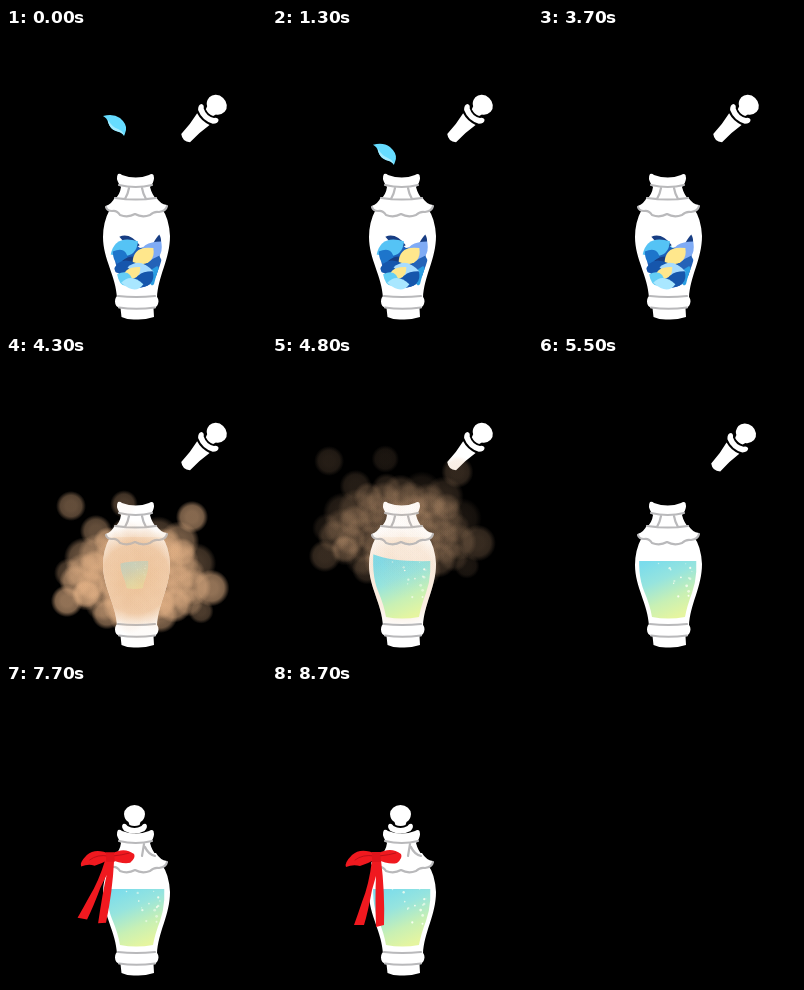
An HTML page with a canvas for the animation above (8.8 s loop, 260 by 300 pixels).

```html
<!DOCTYPE html>
<html lang="en">
<head>
<meta charset="utf-8">
<title>Potion bottle</title>
<style>
  html, body { margin: 0; width: 100%; height: 100%; overflow: hidden; background: #000; }
  canvas { display: block; width: 260px; height: 300px; }
</style>
</head>
<body>
<canvas id="stage" width="260" height="300"></canvas>
<script>
const ctx = document.getElementById('stage').getContext('2d');
const LOOP = 8800, STEP = 100, GRAY = '#b9b9bb';

const clamp = v => Math.max(0, Math.min(1, v));
const span = (t, a, b) => clamp((t - a) / (b - a));
const smooth = p => p * p * (3 - 2 * p);
const easeOut = p => 1 - (1 - p) ** 3;

function track(keys, t) {
  if (t <= keys[0][0]) return keys[0].slice(1);
  for (let i = 1; i < keys.length; i++) {
    const [a, b] = [keys[i - 1], keys[i]];
    if (t <= b[0]) {
      const p = smooth(span(t, a[0], b[0]));
      return a.slice(1).map((v, k) => v + (b[k + 1] - v) * p);
    }
  }
  return keys[keys.length - 1].slice(1);
}

function seeded(seed) {
  return () => (seed = (seed * 16807) % 2147483647) / 2147483647;
}

function layer(draw) {
  ctx.save();
  draw();
  ctx.restore();
}

function fill(path, color) {
  ctx.fillStyle = color;
  ctx.fill(path);
}

function line(path, color, width) {
  ctx.strokeStyle = color;
  ctx.lineWidth = width;
  ctx.lineCap = ctx.lineJoin = 'round';
  ctx.stroke(path);
}

const shape = {
  neck: new Path2D('M112 146Q114 145 116 147Q130 152 143 147Q146 145 147.500 147Q149 152 145.500 157L144 159Q146 167 151 172L108 172Q114 167 115 159L113 156Q109.500 150 112 146Z'),
  collar: new Path2D('M109 169L150 169Q154 176 161 177Q160 184 153 184Q148 183 144 187Q136 190 129 186Q122 190 114 187Q111 182 106 183Q100 182 99.500 178Q106 176 109 169Z'),
  body: new Path2D('M104 181Q97 194 97 209C97 231 110 248 111 270L151 270C152 248 164 231 164 208Q163 190 156 181Z'),
  base: new Path2D('M112 267.500H149Q152.500 269 152.500 273.500Q152 279 147.500 280L148 289Q138 292 130 291.500Q122 292 115.500 289L114.500 280Q109 279 109 273.500Q109 269 112 267.500Z'),
  window: new Path2D('M101 205L158 205Q160 220 154 237Q149 250 147 261Q130 264 114 261Q112 249 106 235Q100 220 101 205Z'),
  liquid: new Path2D('M102 190L157 190Q161 218 154 237Q149 250 147 261Q130 264 114 261Q112 249 106 235Q99 218 102 190Z'),
  rims: new Path2D('M113 157Q130 161 146 157M100 179Q101 183 106 183Q111 182 114 187Q122 190 129 186Q136 190 144 187Q148 183 153 184Q160 183 161 178M112 268Q130 270 149 268M113 279.500Q130 282 149 279.500'),
  facets: new Path2D('M123 160Q122 166 119 171M136 160Q137 166 140 171M109 170Q130 173 150 170'),
  tied: new Path2D('M138 160L136 172M139 163Q142 170 149 172'),
  feather: new Path2D('M-12 -9Q-2 -12 5 -7Q12 -1 11 5Q10 9 9 11Q7 7 1 6Q-5 4 -7 -3Q-8 -7 -12 -9Z'),
  featherEdge: new Path2D('M-7 -5Q-3 2 3 4Q8 6 9 10Q6 7 1 6Q-5 4 -7 -3Z'),
  heap: new Path2D('M110 218Q124 211 134 220Q144 218 153 217Q155 232 151 245Q147 260 130 260Q119 260 115 250Q106 234 110 218Z'),
  plug: new Path2D('M-8.500 20Q0 23 8.500 20Q6 32 6 46Q0 51 -6 46Q-6 32 -8.500 20Z'),
  ring: new Path2D('M-11.500 10Q-9 9 -7 12Q0 16 7 12Q9 9 11.500 10Q14 13 10 17Q0 22 -10 17Q-14 13 -11.500 10Z'),
  knob: new Path2D('M-10.500 0A10.500 9 0 0 1 10.500 0Q10 6 6 8L5 11Q0 13 -5 11L-6 8Q-10 6 -10.500 0Z'),
  bow: new Path2D('M0 -2Q-15 -9 -24 -1Q-32 7 -30 11Q-23 8 -16 10Q-7 7 0 3Q13 9 21 7Q27 2 25 -2Q17 -8 8 -5Q4 -4 0 -2Z'),
  tails: new Path2D('M-4 4L5 4Q9 36 8 69L0 71Q-1 40 0 20L-4 34Q-8 56 -12 69L-22 69Q-18 58 -14 46Q-7 29 -4 4Z'),
  folds: new Path2D('M-2 0Q-13 -2 -21 4M3 0Q13 -1 20 -3')
};

// x, y, half length, half width, angle, color
const petals = [
  [123, 214, 11, 9, .5, '#173d83'], [150, 216, 10, 8, 1.9, '#173d83'],
  [144, 222, 14, 19, 2.5, '#7fabf5'], [119, 222, 15, 18, -.3, '#55c3f5'],
  [113, 230, 9, 15, .8, '#1d75cb'], [147, 238, 12, 17, 2.1, '#2462b8'],
  [128, 238, 13, 16, .4, '#173d83'], [138, 230, 13, 17, -.5, '#ffe78c'],
  [119, 241, 12, 15, -.2, '#1656ac'], [147, 247, 10, 14, 2, '#2b9ee2'],
  [134, 243, 13, 14, .3, '#a7dcff'], [126, 247, 11, 12, -.5, '#ffe78c'],
  [118, 252, 9, 14, .7, '#63cef5'], [139, 253, 12, 15, -.6, '#1656ac'],
  [126, 257, 11, 12, .2, '#a9e7ff']
];

const featherKeys = [
  [0, 109, 97, 0], [500, 122, 106, -.35], [1100, 108, 121, .15],
  [1700, 127, 140, -.4], [2100, 126, 157, -.1], [2600, 137, 180, -.35],
  [3100, 129, 203, .1], [3600, 128, 225, 0]
];
const stopperKeys = [
  [5400, 211, 76.5, .75], [6300, 129, 93, 0], [6600, 129, 110, 0],
  [7200, 129, 125, 0], [7400, 128.5, 130, 0]
];

const rand = seeded(71);
const puffs = [
  [65, 150, 13, .4], [118, 148, 12, .3], [186, 161, 14, .55], [205, 232, 16, .6],
  [61, 245, 14, .6], [63, 217, 13, .3], [80, 238, 12, .6], [195, 255, 11, .3], [90, 175, 14, .4]
];
for (let i = 0; i < 54; i++) {
  const a = i * 2.4, d = Math.sqrt((i + 1) / 54);
  puffs.push([
    132 + Math.cos(a) * d * 64, 220 + Math.sin(a) * d * 46,
    12 + rand() * 6, .25 + rand() * .35
  ]);
}
const sparkles = Array.from({ length: 15 }, () => [
  120 + rand() * 34, 206 + rand() * 40, .5 + rand() * .9, rand() * 6
]);

function drawStopper(t) {
  const [x, y, angle] = track(stopperKeys, t);
  layer(() => {
    ctx.translate(x, y);
    ctx.rotate(angle);
    for (const part of [shape.plug, shape.knob, shape.ring]) {
      line(part, '#000', 1.5);
      fill(part, '#fff');
    }
  });
}

function drawSmoke(t, strength) {
  if (t <= 3700 || t >= 5500) return;
  const grow = easeOut(span(t, 3600, 4300));
  const late = Math.max(0, t - 4300) / 500;
  const rise = 45 * late ** 1.4;
  const fade = strength * span(t, 3650, 4150) * (1 - span(t, 4300, 5500)) ** 1.9;
  for (const [px, py, r, alpha] of puffs) {
    const x = 130 + (px - 130) * grow * (1 + .06 * late * late) - 4 * late;
    const y = 215 + (py - 215) * grow - rise;
    const g = ctx.createRadialGradient(x, y, r * .4, x, y, r * 1.15);
    g.addColorStop(0, `rgba(228,178,134,${alpha * fade})`);
    g.addColorStop(.55, `rgba(228,178,134,${alpha * fade * .85})`);
    g.addColorStop(1, 'rgba(228,178,134,0)');
    ctx.fillStyle = g;
    ctx.fillRect(x - 24, y - 24, 48, 48);
  }
}

function drawFeather(t, alpha) {
  const [x, y, angle] = track(featherKeys, t);
  layer(() => {
    ctx.globalAlpha = alpha;
    ctx.translate(x, y);
    ctx.rotate(angle);
    fill(shape.feather, '#66dcff');
    fill(shape.featherEdge, '#a5ecff');
  });
}

function drawPetals(t) {
  const alpha = 1 - span(t, 3800, 4300);
  if (!alpha) return;
  layer(() => {
    ctx.clip(shape.window);
    drawFeather(t, alpha);
    ctx.globalAlpha = alpha;
    fill(shape.heap, '#1d5fb8');
    for (const [x, y, l, w, angle, color] of petals) {
      layer(() => {
        ctx.translate(x, y);
        ctx.rotate(angle);
        fill(new Path2D(`M${-l} 0Q${-l / 3} ${-w} ${l} ${-w / 4}Q${l / 2} ${w * .8} ${-l} 0Z`), color);
      });
    }
  });
}

function drawTint(t) {
  const alpha = span(t, 3700, 4200) * (1 - span(t, 4350, 5100));
  if (!alpha) return;
  const g = ctx.createRadialGradient(130, 224, 8, 130, 222, 52);
  g.addColorStop(0, `rgba(238,194,150,${alpha * .9})`);
  g.addColorStop(.6, `rgba(241,202,164,${alpha * .85})`);
  g.addColorStop(1, 'rgba(246,216,184,0)');
  fill(shape.body, g);
  fill(shape.collar, g);
}

function drawLiquid(t) {
  const alpha = span(t, 4000, 4700);
  if (!alpha) return;
  const size = .25 + .75 * smooth(span(t, 4000, 4800));
  const calm = 1 - span(t, 4500, 5400);
  const slosh = 12 * calm * Math.cos((t - 4800) / 120);
  layer(() => {
    ctx.globalAlpha = alpha;
    ctx.translate(127, 205);
    ctx.scale(size, size);
    ctx.translate(-127, -205);
    ctx.clip(shape.liquid);
    const g = ctx.createLinearGradient(116, 203, 140, 260);
    g.addColorStop(0, '#7adcec');
    g.addColorStop(.35, '#96e4de');
    g.addColorStop(.7, '#c8f0b4');
    g.addColorStop(1, '#e5f5a0');
    fill(new Path2D(`M98 ${205 - slosh}Q118 ${205 + slosh * .2} 162 205V265H98Z`), g);
    for (const [x, y, r, phase] of sparkles) {
      ctx.globalAlpha = alpha * (.75 + .25 * Math.sin(t / 500 + phase));
      const dot = new Path2D();
      dot.arc(x, y + Math.sin(t / 900 + phase) * 2, r, 0, 7);
      fill(dot, '#fbfff2');
    }
  });
}

function drawBottle(t) {
  for (const part of ['neck', 'body', 'collar', 'base']) fill(shape[part], '#fff');
  if (t < 3600) {
    layer(() => {
      ctx.clip(new Path2D('M0 0H260V147H0Z'));
      drawFeather(t, 1);
    });
    layer(() => {
      ctx.clip(new Path2D('M0 147H260V205H0Z'));
      drawFeather(t, .2);
    });
  }
  drawPetals(t);
  drawTint(t);
  drawLiquid(t);
  line(shape.rims, GRAY, 2.2);
  line(t < 7500 ? shape.facets : shape.tied, GRAY, 2.2);
}

function drawRibbon(t) {
  const size = easeOut(span(t, 7300, 7900));
  if (!size) return;
  const swing = .35 * Math.sin(Math.PI * span(t, 7500, 8700));
  layer(() => {
    ctx.translate(104, 172);
    ctx.scale(size, size);
    layer(() => {
      ctx.rotate(swing);
      fill(shape.tails, '#f0191f');
    });
    fill(shape.bow, '#f0191f');
    line(shape.folds, '#bd1018', 1);
    fill(new Path2D('M-4 -4H4L5 6H-4Z'), '#e0141b');
  });
}

function render(t) {
  ctx.fillStyle = '#000';
  ctx.fillRect(0, 0, 260, 300);
  drawStopper(t);
  drawSmoke(t, 1);
  drawBottle(t);
  drawSmoke(t, .15);
  drawRibbon(t);
}

const start = performance.now();
function tick() {
  const t = (performance.now() - start) % LOOP;
  render(Math.floor(t / STEP) * STEP);
  requestAnimationFrame(tick);
}
tick();
</script>
</body>
</html>
```
